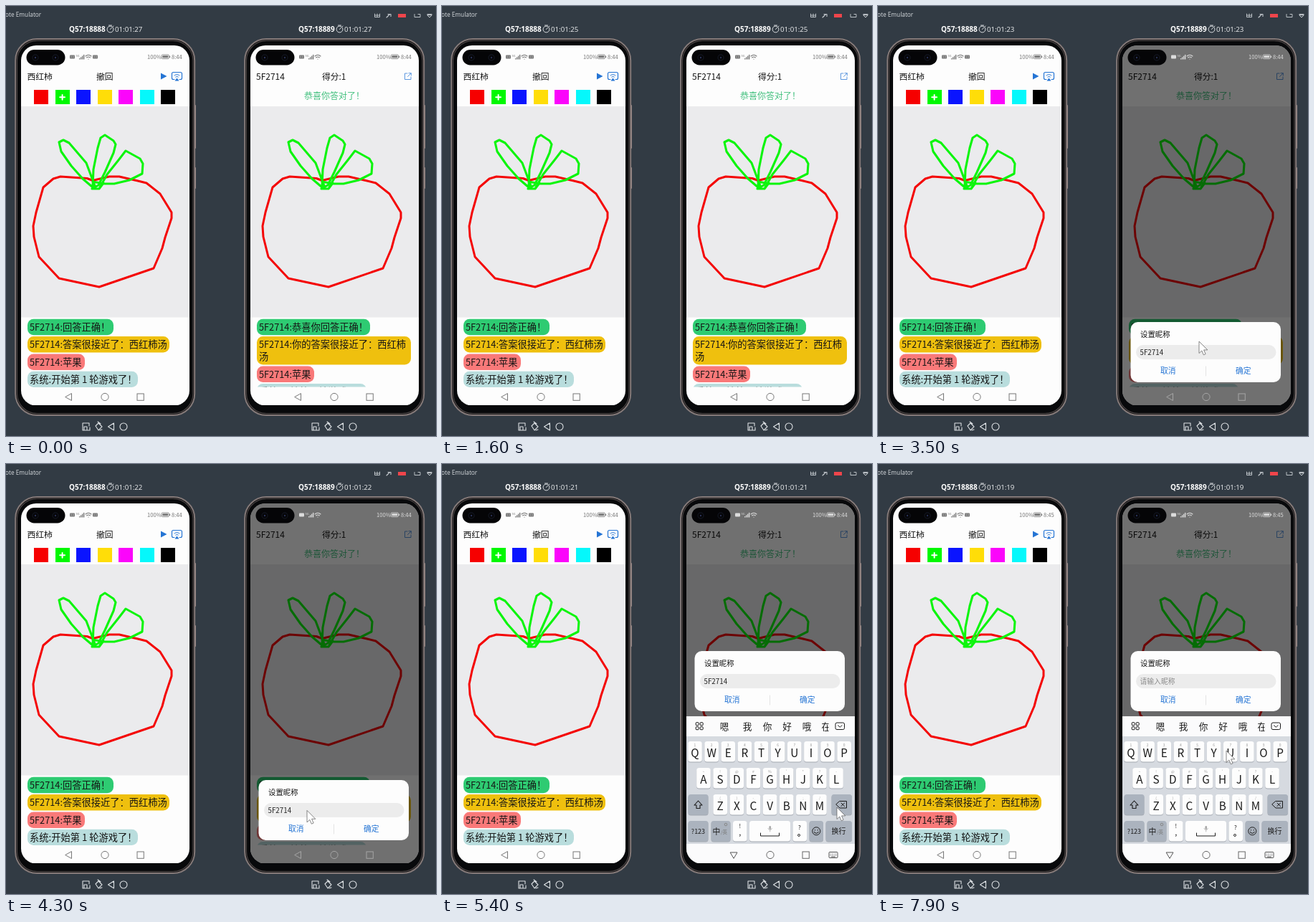
Animation of 600x600 px, one loop 8000 ms. Source, as an HTML page:

```html
<!DOCTYPE html>
<html lang="zh">
<head>
<meta charset="utf-8">
<style>
html, body { margin: 0; width: 100%; height: 100%; overflow: hidden; background: #323b44; }
svg { display: block; width: 600px; height: 600px; }
text { font-family: "Noto Sans CJK SC", "Noto Sans", sans-serif; white-space: pre; }
.ui { font-family: "Open Sans", "Noto Sans", sans-serif; }
.line { fill: none; stroke-linecap: round; stroke-linejoin: round; }
.mid { text-anchor: middle; }
</style>
</head>
<body>
<svg id="stage" viewBox="0 0 600 600" xmlns="http://www.w3.org/2000/svg"></svg>
<script>
const LOOP = 8000;
const NAME = '5F2714';
const DEVICE = 'Q57';
const BLUE = '#2474d4';

const rect = (x, y, w, h, fill, r = 0, more = '') =>
  `<rect x="${x}" y="${y}" width="${w}" height="${h}" rx="${r}" fill="${fill}" ${more}/>`;
const text = (x, y, size, str, fill = '#151515', more = '') =>
  `<text x="${x}" y="${y}" font-size="${size}" fill="${fill}" ${more}>${str}</text>`;
const line = (d, color, width = 1) =>
  `<path class="line" d="${d}" stroke="${color}" stroke-width="${width}"/>`;
const ring = (x, y, r, color, width = 1) =>
  `<circle cx="${x}" cy="${y}" r="${r}" fill="none" stroke="${color}" stroke-width="${width}"/>`;
const group = (id, body, more = '') => `<g id="${id}" ${more}>${body}</g>`;

function titleBar() {
  const c = '#c9ced3';
  return text(-1, 15, 8.3, 'ote Emulator', '#d8dce0', 'class="ui"') +
    line('M514.5 11v4.5h7V11M518 11v4M514.5 13h7', c, .9) +
    line('M531 16l4-4M533 11.5h4v3', c, 1.1) +
    rect(547, 11, 11, 5, '#f0454b') +
    line('M570 11.5v4h8v-4h-3', c, .9) +
    line('M588 13l3 3 3-3zM588 11.5h6', c, 1);
}

function deviceHeader(port, clockId) {
  const c = '#eef0f2';
  return text(88, 36, 10, `${DEVICE}:${port}`, '#fff', 'class="ui" font-weight="700"') +
    ring(145.5, 32.5, 4.4, c, .9) + line('M145.5 32.5l2-2.2M143.5 27h4M149 29l1-1', c, .9) +
    text(152, 36, 9.7, '', '#f2f3f4', `class="ui" id="${clockId}"`);
}

function deviceFooter() {
  const c = '#dde1e4';
  return line('M112 582h-5v10h10v-4M112 582h4v4M109 592v-5h4v4', c, 1.1) +
    line('M125 586l4-4 5 5-5 5zM128 580l4 3M131 592l3-1', c, 1.1) +
    line('M150.5 582v10l-8-5z', c, 1.1) + ring(164, 587, 5, c, 1.1);
}

function shell() {
  return rect(262, 138, 3, 61, '#a3918e', 1) + rect(262, 225, 3, 30, '#a3918e', 1) +
    rect(13.2, 46, 250, 525, '#08090b', 30, 'stroke="#857a79" stroke-width="2"') +
    rect(15.5, 48.3, 245.4, 520.4, 'none', 28, 'stroke="#4a4444" stroke-width="1.2"');
}

// Uses currentColor so the bars can brighten over the dimmed page.
function statusBar(clockId, extra) {
  const c = 'currentColor';
  const box = x => rect(x, 68.5, 7, 5, c, 1) + line(`M${x + 2} 70v2M${x + 5} 70v2`, '#ddd', .6);
  const bars = [0, 1, 2, 3].map(i =>
    rect(102 + i * 2, 73 - i * 1.7, 1.3, 1.5 + i * 1.7, c)).join('');
  return box(89) + text(97.5, 71, 4, '5G', c) + bars +
    line('M111 70q4-3.6 8 0M112.6 72q2.4-2 4.8 0M115 74v.1', c, 1.1) +
    (extra ? box(121) : '') +
    text(197, 74, 7.6, '100%', c) +
    rect(217, 68, 10.5, 5.6, 'none', 1.4, `stroke="${c}" stroke-width=".8"`) +
    rect(218.3, 69.3, 8, 3, c, .5) + rect(228.2, 69.6, 1, 2.4, c) +
    text(231, 74, 7.6, '', c, `id="${clockId}"`);
}

const camera = rect(28.5, 61, 54, 21.5, '#050507', 10.7) +
  ring(41, 72, 4, '#11141d', 1.4) + ring(69, 72, 4, '#11141d', 1.4) +
  '<circle cx="41" cy="72" r="1.2" fill="#2a3358"/><circle cx="69" cy="72" r="1.2" fill="#262e4e"/>';

const navRest = ring(138, 545.5, 5.1, 'currentColor') +
  rect(183, 541, 9.3, 9.3, 'none', 0, 'stroke="currentColor" stroke-width="1"');
const navBack = line('M91.5 541v9.5l-8.5-4.75z', 'currentColor');

function drawing() {
  const red = 'M121 243.5L113 240.5 76 238 66 241 52 253 42 288 38 307 39 322 46 350 74 380 ' +
    '130 392 206 366 218 338 222 323 231 296 231 288 215 262 196 247 184 244 158 238 144 238z';
  const leaves = 'M121 253L107 241 91 223 77 203 74 190 80 187 88 191 112 219 124 251' +
    'M121 252L122 228 128 198 132 184 138 180 150 188 153 193 150 205 138 232 129 250 120 255' +
    'M131 253L141 235 157 215 167 202 187 213 191 220 190 234 172 243 151 248 136 248 121 245' +
    'M120 255L130 255 136 247';
  return rect(21, 140, 235, 294.5, '#ebebed') + line(red, '#f40606', 3) + line(leaves, '#0cf50c', 3.1);
}

function bubble(y, w, h, fill, lines, named = true) {
  const who = named ? `<tspan font-size="12.75">${NAME}:</tspan>` : '';
  return rect(30, y, w, h, fill, 8.5) +
    lines.map((s, i) => text(33, y + 16.3 + i * 17, 13.25, i ? s : who + s)).join('');
}

const GREEN = '#2ecb72', GOLD = '#efc00e', PINK = '#f97979', TEAL = '#b9dddd';

function drawerPage() {
  const colors = ['#f60000', '#00f800', '#0a14ff', '#ffdd08', '#fb05fb', '#05f8fb', '#000'];
  return rect(21, 55, 235, 502, '#fdfdfd') +
    text(29.5, 102.5, 11.8, '西红柿') + text(126, 102.5, 11.8, '撤回') +
    `<path d="M216 93.5v9l8.5-4.5z" fill="${BLUE}"/>` +
    line('M235 102.5h-1.5q-2 0-2-2v-6q0-2 2-2h10q2 0 2 2v6q0 2-2 2h-1.5', BLUE, 1.2) +
    line('M235 97q3.5-3 7 0M236.8 99q1.8-1.5 3.5 0', BLUE, 1) +
    `<path d="M235.5 104.5l3-4 3 4z" fill="${BLUE}"/>` +
    colors.map((c, i) => rect(39 + Math.round(i * 29.5), 117, 20, 20, c)).join('') +
    line('M75.2 127.3h6.8M78.6 123.9v6.8', '#fff', 2) +
    drawing() +
    bubble(436.7, 120, 22.6, GREEN, ['回答正确！']) +
    bubble(461, 198, 22.6, GOLD, ['答案很接近了：西红柿汤']) +
    bubble(485.5, 80, 22.6, PINK, ['苹果']) +
    bubble(509.7, 154, 22.3, TEAL, ['系统:开始第 1 轮游戏了！'], false);
}

function guesserPage() {
  return rect(21, 55, 235, 502, '#fdfdfd') +
    text(29, 102.5, 12, NAME) + text(121, 102.5, 11.8, '得分:1') +
    line('M240 94h-3.5v8.5h8.5V99M240.5 98.5l4.5-4.5M242 93.7h3.3v3.3', '#4a8cdc', .9) +
    text(96, 130, 12, '恭喜你答对了！', '#3fbf7c') +
    drawing() +
    `<g clip-path="url(#chat)">` +
    bubble(436.7, 158, 22.6, GREEN, ['恭喜你回答正确！']) +
    bubble(461, 215, 39.5, GOLD, ['你的答案很接近了：西红柿', '汤']) +
    bubble(502.5, 80, 22.6, PINK, ['苹果']) +
    bubble(527, 153, 22.3, TEAL, ['系统:开始第 1 轮游戏了！'], false) + '</g>';
}

// Drawn from its own top edge at y = 0.
const dialog = rect(32.5, 0, 209.5, 84, '#fdfdfd', 10) +
  text(46, 20.5, 10.4, '设置昵称') +
  rect(40, 32, 195.5, 20, '#ececec', 10) +
  text(45.5, 45.8, 9.8, '', '#222', 'id="field"') +
  text(74, 72, 10.8, '取消', BLUE) + text(179, 72, 10.8, '确定', BLUE) +
  line('M137.5 62v13', '#dcdcdc', .8);

function keyboard() {
  const key = (x, y, w, fill = '#fdfdfd') =>
    rect(x, y + 1, w, 28.5, '#a4a9b1', 3.5) + rect(x, y, w, 28.5, fill, 3.5);
  const grey = '#abb3be', ink = '#1a1a1a';
  const row = (letters, hints, x, y) => [...letters].map((ch, i) => {
    const cx = x + i * 23.13;
    return key(cx - 9.8, y, 19.6) + text(cx, y + 22.3, 15.3, ch, ink, 'class="mid"') +
      text(cx, y + 7, 5, hints[i], '#999', 'class="mid"');
  }).join('');
  const words = [...'嗯我你好哦'].map((ch, i) =>
    text([74, 106, 134, 161.5, 189][i], 370.5, 12.6, ch, ink, 'class="mid"')).join('');
  const grid = [[35, 361], [41, 361], [35, 367], [41, 367]].map(([x, y]) =>
    rect(x - .8, y - .3, 4, 4, 'none', .8, `stroke="${ink}" stroke-width="1"`)).join('');
  return rect(21, 352, 235, 205, '#fbfbfc') + rect(21, 380, 235, 150, '#d6dae0') +
    grid + words +
    `<g clip-path="url(#cut)">${text(209.5, 370.5, 12.6, '在', ink)}</g>` +
    rect(229, 361, 12.5, 9.5, 'none', 2, `stroke="${ink}" stroke-width="1"`) +
    line('M232.5 364.7l2.8 2.5 2.8-2.5', ink) +
    row('QWERTYUIOP', '1234567890', 33, 387) +
    row('ASDFGHJKL', '~!@#%\'*?-', 45, 424) +
    row('ZXCVBNM', '()-_:;/', 68.2, 461) +
    key(23.5, 461, 28, grey) + line('M37.5 470l-5.5 6h3v4.5h5V476h3z', ink, 1.1) +
    group('erase', key(223.5, 461, 28.5, grey)) +
    line('M235 470.5h9.5v9.5h-9.5l-5-4.75zM237 473l4.5 4.5M241.5 473l-4.5 4.5', ink, 1) +
    key(23.5, 498, 28, grey) + text(37.5, 516, 9, '?123', ink, 'class="mid"') +
    key(55.5, 498, 27, grey) + text(57.5, 517, 10.8, '中', ink) + text(69, 516, 6.5, '/英', '#777') +
    ring(76, 503, 1.8, '#888', 1) +
    key(86, 498, 19.5) + text(95.7, 508, 8, '!', ink, 'class="mid"') + text(95.7, 518, 11, ',', ink, 'class="mid"') +
    key(109, 498, 57) + line('M124.5 515v4h26v-4', ink, 1) +
    rect(136.4, 505, 2.6, 5, '#aaa', 1.3) + line('M135 508.5q2.7 5 5.4 0M137.7 511.5v1.5', '#aaa', .8) +
    key(169.5, 498, 19.5) + text(179, 510, 8, '?', ink, 'class="mid"') + ring(178, 518, 1.5, ink, .9) +
    key(192.5, 498, 19.5, grey) + ring(202.3, 512.3, 5.5, ink) +
    line('M199.4 513.5q2.9 3.6 5.8 0M200.4 510.5v.5M204.2 510.5v.5', ink, 1.1) +
    key(215.5, 498, 36.5, grey) + text(233.5, 516, 10, '换行', ink, 'class="mid"');
}

const navKeys = line('M82.5 542h9.5l-4.75 8z', '#555') +
  rect(220, 541.5, 12, 8, 'none', 1, 'stroke="#555" stroke-width="1"') +
  line('M222 544h.2M224.5 544h.2M227 544h.2M229.5 544h.2M222 546h.2M224.5 546h.2M227 546h.2M229.5 546h.2M223.5 548h5', '#555', 1);

const left = deviceHeader(18888, 'clockA') + shell() +
  `<g clip-path="url(#screen)">${drawerPage()}</g>` + camera +
  `<g color="#777">${statusBar('timeA', true)}${navRest}${navBack}</g>` + deviceFooter();

const right = deviceHeader(18889, 'clockB') + shell() +
  '<g clip-path="url(#screen)">' + guesserPage() +
  group('dim', rect(21, 55, 235, 502, '#000')) +
  group('dialog', dialog) + group('keys', keyboard()) + '</g>' + camera +
  group('bars', statusBar('timeB', false)) +
  group('nav', navRest + group('back', navBack)) + group('navKeys', navKeys) + deviceFooter();

const $ = id => document.getElementById(id);
$('stage').innerHTML =
  `<defs><clipPath id="screen">${rect(21, 55, 235, 502.5, '#000', 21)}</clipPath>
  <clipPath id="chat">${rect(21, 434, 235, 97.5, '#000')}</clipPath>
  <clipPath id="cut">${rect(205, 355, 14.5, 24, '#000')}</clipPath></defs>` +
  rect(0, 0, 600, 600, '#323b44') + titleBar() + left +
  `<g transform="translate(320 0)">${right}</g>` +
  group('pointer', '<path d="M0 0v16.5l3.8-3.5 2.5 5.8 2.8-1.2-2.5-5.7h5.2z" fill="#fff" stroke="#555" stroke-width=".7"/>');

// Eased value from rows of [time, value, ...].
function at(t, rows, col = 1) {
  if (t <= rows[0][0]) return rows[0][col];
  for (let i = 1; i < rows.length; i++) {
    const a = rows[i - 1], b = rows[i];
    if (t < b[0]) {
      const p = (t - a[0]) / (b[0] - a[0]);
      return a[col] + (b[col] - a[col]) * p * p * (3 - 2 * p);
    }
  }
  return rows[rows.length - 1][col];
}

const DIM = [[2600, 0], [2930, .555]];
const RISE = [[4400, 441], [4770, 261]];
const KEYS = [[4750, 205], [5050, 0]];
const POINTER = [
  [1650, 602, 200], [1850, 577, 145], [2150, 558, 98], [2500, 558, 98], [2800, 495, 358],
  [3500, 448, 468], [3950, 415, 483], [4250, 415, 483], [4700, 556, 494], [5200, 551, 479],
  [6950, 551, 479], [7900, 486, 400]
];
const ERASE = { start: 5500, gap: 190 };

const set = (id, name, value) => $(id).setAttribute(name, value);
const show = (id, on) => set(id, 'visibility', on ? 'visible' : 'hidden');

function render(t) {
  const seconds = 27 - Math.floor((t + 900) / 1000);
  const time = t < 7400 ? '8:44' : '8:45';
  for (const s of 'AB') {
    $('clock' + s).textContent = '01:01:' + seconds;
    $('time' + s).textContent = time;
  }

  const dim = at(t, DIM);
  set('dim', 'opacity', dim);
  const lit = Math.min(1, dim / .35);
  const grey = to => { const v = Math.round(119 + (to - 119) * lit); return `rgb(${v},${v},${v})`; };
  set('bars', 'color', grey(220));

  const drop = at(t, KEYS);
  const open = drop < 30, closed = t < RISE[0][0];
  set('keys', 'transform', `translate(0 ${drop})`);
  show('keys', drop < 205);
  set('nav', 'color', open ? '#666' : grey(165));
  show('nav', open || closed);
  show('back', closed);
  show('navKeys', open);

  set('dialog', 'transform', `translate(0 ${at(t, RISE)})`);
  set('dialog', 'opacity', Math.min(1, Math.max(0, (t - 2600) / 150)));
  const gone = t < ERASE.start ? 0 : 1 + Math.floor((t - ERASE.start) / ERASE.gap);
  const typed = NAME.slice(0, Math.max(0, NAME.length - gone));
  $('field').textContent = typed || '请输入昵称';
  set('field', 'fill', typed ? '#222' : '#8a8a8a');
  $('erase').lastChild.setAttribute('fill', t > 5450 && t < 6900 ? '#f4f5f6' : '#abb3be');

  set('pointer', 'transform', `translate(${at(t, POINTER)} ${at(t, POINTER, 2)})`);
  show('pointer', t > 1650);
}

const begin = performance.now();
function tick() {
  render((performance.now() - begin) % LOOP);
  requestAnimationFrame(tick);
}
tick();
</script>
</body>
</html>
```
